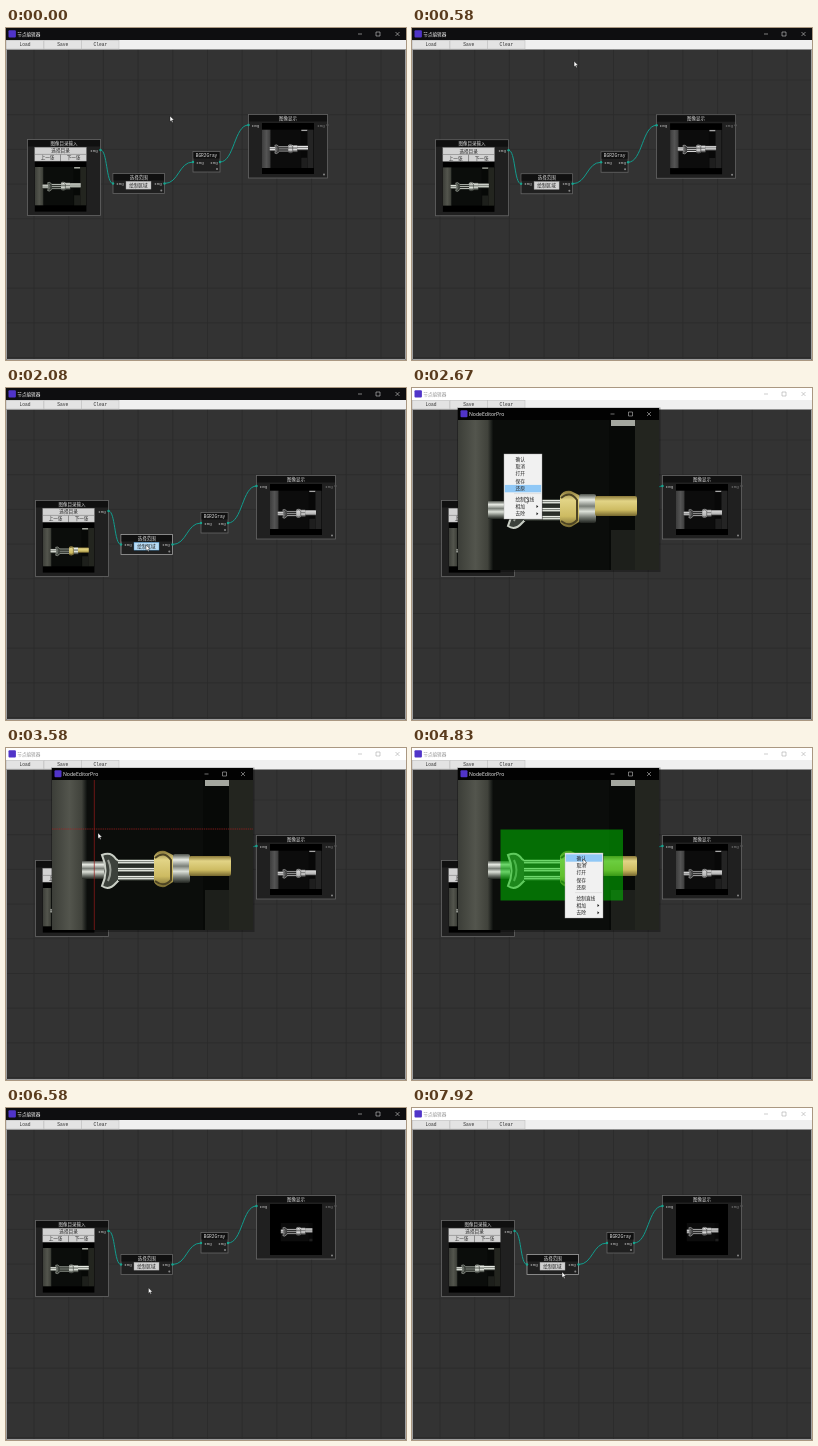
These frames come from a looping animation (400 by 332 pixels, 8 s). An HTML page:

```html
<!DOCTYPE html>
<html lang="zh-CN">
<head>
<meta charset="utf-8">
<title>节点编辑器</title>
<style>
html, body { margin: 0; width: 100%; height: 100%; overflow: hidden; background: #333; }
svg { display: block; width: 100%; height: 100%; }
text { font-family: "Noto Sans CJK SC", "Noto Sans CJK", sans-serif; }
.mono { font-family: "Liberation Mono", monospace; }
.latin { font-family: "Open Sans", sans-serif; }
.gray { filter: grayscale(1); }
</style>
</head>
<body>
<svg id="stage" viewBox="0 0 400 332" preserveAspectRatio="none">
  <defs>
    <linearGradient id="metal" x2="0" y2="1">
      <stop offset="0" stop-color="#4c504a"/><stop offset=".2" stop-color="#e8ebe4"/>
      <stop offset=".42" stop-color="#7a7f78"/><stop offset=".6" stop-color="#dce0d8"/>
      <stop offset=".82" stop-color="#6d726b"/><stop offset="1" stop-color="#20231f"/>
    </linearGradient>
    <linearGradient id="brass" x2="0" y2="1">
      <stop offset="0" stop-color="#8a7838"/><stop offset=".25" stop-color="#e2d486"/>
      <stop offset=".7" stop-color="#cdbb62"/><stop offset="1" stop-color="#75672f"/>
    </linearGradient>
    <linearGradient id="wall">
      <stop offset="0" stop-color="#3c3e38"/><stop offset=".5" stop-color="#53554d"/>
      <stop offset=".85" stop-color="#40423b"/><stop offset="1" stop-color="#0d100e"/>
    </linearGradient>
    <clipPath id="frame"><rect width="201" height="150"/></clipPath>
    <clipPath id="region"><rect x="42" y="49" width="123" height="71"/></clipPath>
  </defs>
  <g id="scene"></g>
</svg>
<script>
const LOOP = 8000, STEP = 1000 / 12;
const scene = document.getElementById('scene');

// Cursor stops: time, x, y
const PATH = [
  [0, 164, 88], [80, 164, 88], [400, 160, 33], [500, 160, 33], [750, 168, 34], [920, 168, 34],
  [1330, 78, 133], [1750, 78, 133], [2000, 140, 157], [2170, 140, 157], [2420, 92, 66],
  [2580, 110, 98], [2670, 113, 109], [2750, 113, 118], [2920, 114, 118], [3080, 146, 119],
  [3170, 146, 119], [3420, 100, 94], [3580, 92, 85], [3800, 92, 85], [4330, 215, 156],
  [4420, 215, 156], [4590, 153, 105], [4750, 171, 111], [4920, 171, 111], [5080, 237, 26],
  [5170, 237, 26], [5420, 74, 130], [6500, 74, 130], [6750, 338, 322], [7080, 205, 232],
  [7330, 205, 232], [7750, 150, 164], [8000, 150, 164]
];

// Pictures in the folder: start time, vertical shift, brass or not
const SHOTS = [
  [0, -14, 0], [1400, 0, 1], [5580, -4, 0], [5830, -10, 1], [6080, 3, 0], [6330, -8, 0]
];

const MENU = ['确认', '取消', '打开', '保存', '还原', '绘制直线', '相加', '去除'];

const within = (t, a, b) => t >= a && t < b;
const smooth = p => p * p * (3 - 2 * p);

function cursorAt(t) {
  const i = Math.max(1, PATH.findIndex(k => k[0] >= t));
  const [t0, x0, y0] = PATH[i - 1], [t1, x1, y1] = PATH[i];
  const p = smooth((t - t0) / (t1 - t0));
  return [x0 + (x1 - x0) * p, y0 + (y1 - y0) * p];
}

const rect = (x, y, w, h, fill, more = '') =>
  `<rect x="${x}" y="${y}" width="${w}" height="${h}" fill="${fill}" ${more}/>`;
const line = (d, color, width = 0.6, more = '') =>
  `<path d="${d}" fill="none" stroke="${color}" stroke-width="${width}" ${more}/>`;
// y is the middle of the glyphs
const text = (s, x, y, size, fill, anchor = 'middle', cls = '') =>
  `<text x="${x}" y="${y + size * 0.35}" font-size="${size}" fill="${fill}" text-anchor="${anchor}" class="${cls}">${s}</text>`;
const group = (x, y, body, scale = 1) =>
  `<g transform="translate(${x} ${y}) scale(${scale})">${body}</g>`;

function grid() {
  let major = '';
  for (let i = 0; i < 11; i++) major += `M${28 + i * 34.7} 21V332M0 ${52 + i * 34.7}H400`;
  return rect(0, 0, 400, 332, '#333') + line(major, '#2b2b2b', 0.8);
}

function windowButtons(xs, y, color) {
  const [a, b, c] = xs;
  return line(`M${a - 2} ${y}h4M${b - 2} ${y - 2}h4v4h-4zM${c - 2} ${y - 2}l4 4m0-4l-4 4`, color, 0.5);
}

function appBar(active) {
  const ink = active ? '#eee' : '#999';
  let out = rect(0, 0, 400, 12, active ? '#0e0e10' : '#fff') +
    rect(2.5, 2.2, 7.4, 7.4, '#5034c8', 'rx="1"') +
    text('节点编辑器', 11.3, 6, 4.6, ink, 'start') +
    windowButtons([354, 372, 391.5], 6, ink) + rect(0, 12, 400, 9.5, '#f0f0f0');
  ['Load', 'Save', 'Clear'].forEach((s, i) => {
    out += rect(i * 37.7 + 0.3, 12.3, 37.3, 8.7, '#e3e3e3', 'stroke="#bbb" stroke-width=".5"') +
      text(s, i * 37.7 + 19, 16.8, 4.6, '#333', 'middle', 'mono');
  });
  return out + line('M.5 21.5V331.5H399.5V21.5', '#a0a0a0', 1);
}

function photo(dy, brass) {
  const m = 'url(#metal)', b = brass ? 'url(#brass)' : m;
  let bars = '';
  for (let i = 0; i < 3; i++) bars += rect(66, 79.5 + i * 8, 37, 5, m);
  const part = rect(30, 81, 22, 18, m) +
    `<path d="M50 75q9-4 14 4l6 4v14l-6 6q-7 8-14 3q7-15 0-31z" fill="#3c413b" stroke="#c9cec5" stroke-width="2"/>` +
    line('M56 80q5 10 0 21', '#9a9f97', 2) +
    rect(66, 79, 37, 22, '#2b302a') + bars +
    `<path d="M102 76q3-6 11-5l8 4v27l-8 5q-8 1-11-5z" fill="${b}"/>` +
    line('M103 78q9-8 16 2v20q-7 8-16 1', brass ? '#4d4424' : '#3c403c', 2) +
    rect(121, 74, 17, 29, m, 'rx="2"') + rect(137, 76, 42, 20, b, 'rx="2"');
  return `<g clip-path="url(#frame)">` + rect(0, 0, 201, 150, '#0b0d0b') +
    rect(0, 0, 35, 150, 'url(#wall)') + rect(151, 0, 28, 150, '#070907') +
    rect(153, 0, 24, 6, '#a4a79f') + rect(177, 0, 24, 150, '#23251f') +
    rect(153, 110, 24, 40, '#1d1f1b') + group(0, dy, part) + '</g>';
}

const label = (x, y, anchor, fill = '#b8b8b8') => text('Img', x, y, 4.4, fill, anchor, 'mono');
const port = (x, y) => `<circle cx="${x}" cy="${y}" r="1.2" fill="#17a58f"/>`;
const button = (s, x, y, w, h, hot) =>
  rect(x, y, w, h, hot ? '#b9dcf5' : '#d2d2d2', `stroke="${hot ? '#3c8cc8' : '#999'}" stroke-width=".4"`) +
  text(s, x + w / 2, y + h / 2, 4.6, '#222');

function node(title, x, y, w, h, cur, cls = '') {
  const hot = cur && cur[0] > x && cur[0] < x + w && cur[1] > y && cur[1] < y + h;
  return rect(x, y, w, h, '#202020', `stroke="${hot ? '#a0a0a0' : '#646464'}" stroke-width=".8"`) +
    rect(x + 0.5, y + 0.5, w - 1, 6.5, '#101010') +
    text(title, x + w / 2, y + 3.7, 4.5, '#dcdcdc', 'middle', cls);
}

const corner = (x, y) => `<circle cx="${x}" cy="${y}" r="1" fill="#888"/>`;

function wire(x0, y0, x1, y1) {
  const c = Math.max(7, (x1 - x0) * 0.5);
  return line(`M${x0} ${y0}C${x0 + c} ${y0} ${x1 - c} ${y1} ${x1} ${y1}`, '#119d8e', 1);
}

function nodes(t, cur) {
  const [, dy, brass] = SHOTS.filter(s => s[0] <= t).pop();
  const pic = photo(dy, brass);
  const masked = t >= 4960;
  const nextHot = within(t, 1330, 1750) || within(t, 5500, 6500);
  return wire(102.5, 123, 115, 156.5) + wire(166.5, 156.5, 195, 135) + wire(222, 135, 250.5, 98) +
    node('图像目录输入', 29.5, 112.5, 73, 76, cur) +
    button('选择目录', 36.8, 120.3, 51.5, 6.8) +
    button('上一张', 36.8, 127.3, 25.5, 6.8) + button('下一张', 62.8, 127.3, 25.5, 6.8, nextHot) +
    rect(36.8, 134.6, 51.6, 50, '#000') + group(36.8, 140, pic, 0.257) +
    label(100, 123, 'end') + port(102.5, 123) +
    node('选择范围', 115, 146.5, 51.5, 20, cur) +
    button('绘制区域', 128, 154.3, 25, 7.8, within(t, 2000, 2170)) +
    label(118, 156.5, 'start') + label(164, 156.5, 'end') +
    port(115, 156.5) + port(166.5, 156.5) + corner(163.3, 163.6) +
    node('BGR2Gray', 195, 124.5, 27, 20.5, cur, 'mono') +
    label(198, 135, 'start') + label(220, 135, 'end') + port(195, 135) + port(222, 135) + corner(219, 142) +
    node('图像显示', 250.5, 87.5, 79, 63.5, cur) +
    rect(264, 96, 52, 51, '#000') +
    `<g class="gray">${group(264, 102.5, masked ? `<g clip-path="url(#region)">${pic}</g>` : pic, 0.257)}</g>` +
    label(253.5, 98, 'start') + label(327, 98, 'end', '#777') +
    port(250.5, 98) + `<circle cx="329.5" cy="98" r="1.2" fill="#555"/>` + corner(326, 147.5);
}

function menu(x, y, hot) {
  let out = rect(1, 1, 38, 65, '#000', 'opacity=".35"') +
    rect(0, 0, 38, 65, '#f1f1f1', 'stroke="#aaa" stroke-width=".4"') + line('M10 39.6H37', '#ccc', 0.5);
  MENU.forEach((s, i) => {
    const cy = 5 + i * 7.4 + (i > 4 ? 3 : 0);
    if (i === hot) out += rect(0.8, cy - 3.7, 36.4, 7.4, '#90c8f6');
    out += text(s, 11.5, cy, 4.7, '#222', 'start');
    if (i > 5) out += `<path d="M32.5 ${cy - 1.5}l1.8 1.5l-1.8 1.5z" fill="#111"/>`;
  });
  return group(x, y, out);
}

function submenu(x, y, hot) {
  const out = rect(0, 0, 30, 16, '#f1f1f1', 'stroke="#aaa" stroke-width=".4"') +
    (hot ? rect(0.8, 0.8, 28.4, 7.2, '#90c8f6') : '') +
    text('矩形', 10, 4.4, 4.7, '#222', 'start') + text('圆形', 10, 11.6, 4.7, '#222', 'start');
  return group(x, y, out);
}

function dialog(t, cur) {
  let out = rect(45, 19.5, 203.5, 164.5, '#000', 'opacity=".3"') + rect(46, 20, 201, 162, '#020202') +
    rect(48.5, 22.2, 7, 7, '#5034c8', 'rx="1"') +
    text('NodeEditorPro', 57, 25.8, 5.1, '#eee', 'start', 'latin') +
    windowButtons([200.5, 218.5, 237], 26, '#ddd') + group(46, 32, photo(0, 1));
  const aimX = Math.min(211, Math.max(46, cur[0] - 3.7));
  const aimY = Math.min(152, Math.max(32, cur[1] - 4));
  if (t >= 3800) {
    const done = t >= 4420;
    const w = done ? 122.5 : Math.max(0, aimX - 88.3), h = done ? 71 : Math.max(0, aimY - 81);
    out += rect(88.5, 81.5, w, h, '#00c800', 'opacity=".52"');
  }
  if (within(t, 3240, 4420)) {
    out += line(`M${aimX} 32V182`, '#981c1c', 0.7) +
      line(`M46 ${aimY}H247`, '#a82020', 0.7, 'stroke-dasharray="1.4 .8"');
  }
  if (within(t, 2420, 3200)) {
    out += menu(92, 66, t < 2560 ? -1 : t < 2720 ? 4 : 6);
    if (t >= 2830) out += submenu(130, 114.5, t >= 3000);
  }
  if (within(t, 4590, 4960)) out += menu(153, 105, t >= 4660 ? 0 : -1);
  return out;
}

function draw(t) {
  const cur = cursorAt(t);
  const open = within(t, 2240, 5200);
  const back = t < 500 ? 1 : t < 750 ? 1 - smooth((t - 500) / 250) : 0;
  scene.innerHTML = grid() + group(-8 * back, -back, nodes(t, open ? null : cur)) +
    appBar(!open && t < 7880) + (open ? dialog(t, cur) : '') +
    group(cur[0], cur[1],
      '<path d="M0 0V5.6L1.3 4.5L2.2 6.4L3.1 6L2.2 4.1H4z" fill="#fff" stroke="#111" stroke-width=".4"/>');
}

let last = -1;
function tick(now) {
  const step = Math.floor(((now % LOOP) + 7) / STEP) % 96;
  if (step !== last) draw((last = step) * STEP);
  requestAnimationFrame(tick);
}
draw(0);
requestAnimationFrame(tick);
</script>
</body>
</html>
```
